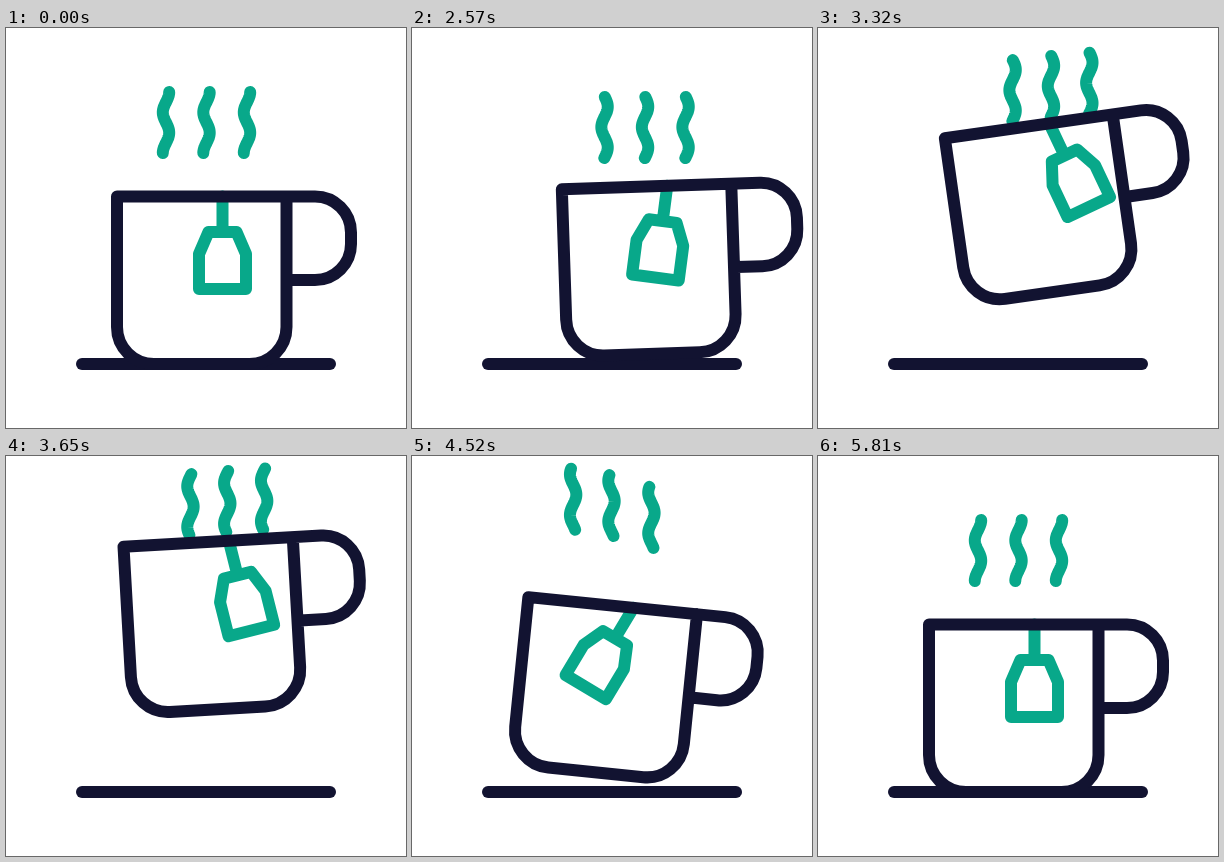
Recreate the animation shown at these times as an HTML page. Size 400 px wide and 400 px high, loop 5840 ms.

```html
<!DOCTYPE html>
<html lang="en">
<head>
<meta charset="utf-8">
<title>Tea cup</title>
<style>
  html, body { margin: 0; width: 100%; height: 100%; overflow: hidden; background: #fff; }
  svg { display: block; width: 100vw; height: 100vh; }
  path { fill: none; stroke: #121331; stroke-width: 12; stroke-linecap: round; stroke-linejoin: round; }
  .green path { stroke: #08a88a; }
</style>
</head>
<body>
<svg viewBox="0 0 400 400">
  <g class="green" id="steam"><path/><path/><path/></g>
  <path d="M76 336H324"/>
  <g id="cup">
    <g class="green" id="bag">
      <path d="M216.5 168.5V204M202.5 204H230.5L240 226V261H193V226Z"/>
    </g>
    <path d="M280.5 168.5V299a37 37 0 0 1-37 37H148a37 37 0 0 1-37-37V168.5H309a36 36 0 0 1 36 36V216a36 36 0 0 1-36 36H283"/>
  </g>
</svg>
<script>
const LOOP = 5840, START = 2000, LIFT = 2570;
const WAVE = 40.7, HEIGHT = 61, SWAY = 3.2;

// Smooth curve through key poses [time, ...values], at rest at both ends.
function curve(keys) {
  const last = keys.length - 1;
  const slope = (i, c) => i === 0 || i === last ? 0 :
    (keys[i + 1][c] - keys[i - 1][c]) / (keys[i + 1][0] - keys[i - 1][0]);
  return time => {
    const t = Math.min(Math.max(time, keys[0][0]), keys[last][0]);
    const i = Math.max(0, keys.findIndex(k => k[0] >= t) - 1);
    const a = keys[i], b = keys[i + 1];
    const span = b[0] - a[0], u = (t - a[0]) / span, v = 1 - u;
    return a.slice(1).map((from, n) => {
      const c = n + 1;
      return v * v * (1 + 2 * u) * from + u * u * (3 - 2 * u) * b[c]
        + span * u * v * (v * slope(i, c) - u * slope(i + 1, c));
    });
  };
}

// x, y, tilt
const cupPose = curve([
  [START, 0, 0, 0],
  [LIFT, 41.5, -10, -1.9],
  [2770, 50, -23, -3.8],
  [3320, 26.8, -71, -8.1],
  [3980, -1.6, -79.5, 2.6],
  [4520, -3.5, -19.3, 5.8],
  [4800, 0, 0, 0]
]);

// tilt
const bagPose = curve([
  [START, 0], [2350, 15], [3320, -25.3], [3980, 5.7],
  [4520, 31], [5080, -8], [5420, 3], [5810, 0]
]);

// x, y
const steamPose = curve([
  [START, 0, 0],
  [LIFT, 32.5, 5],
  [2870, 43, 0],
  [3320, 32.5, -36],
  [3980, 9.5, -55],
  [4520, -1, -45],
  [5200, 0, 0]
]);

const cup = document.getElementById('cup');
const bag = document.getElementById('bag');
const wisps = document.querySelectorAll('#steam path');

function wavePath(x, y, turns) {
  const points = [];
  for (let s = 0; s <= HEIGHT; s++) {
    const sway = SWAY * Math.cos(2 * Math.PI * (s / WAVE + turns));
    points.push((x + sway).toFixed(2) + ' ' + (y + s).toFixed(2));
  }
  return 'M' + points.join('L');
}

function draw() {
  const t = performance.now() % LOOP;
  const [x, y, tilt] = cupPose(t);
  cup.setAttribute('transform', `translate(${x} ${y}) rotate(${tilt} 196 252)`);
  bag.setAttribute('transform', `rotate(${bagPose(t)[0] - tilt} 216.5 168.5)`);

  // The ripple climbs four full waves in three seconds.
  const turns = 4 * Math.min(1, Math.max(0, (t - START) / 3000));
  wisps.forEach((wisp, i) => {
    // After the lift, wisps further left trail behind.
    const rate = 1 + 0.09 * (i - 1);
    const [dx, dy] = steamPose(LIFT + (t - LIFT) * (t > LIFT ? rate : 1));
    wisp.setAttribute('d', wavePath(160 + 40.5 * i + dx, 64 + dy, turns));
  });
  requestAnimationFrame(draw);
}
draw();
</script>
</body>
</html>
```
